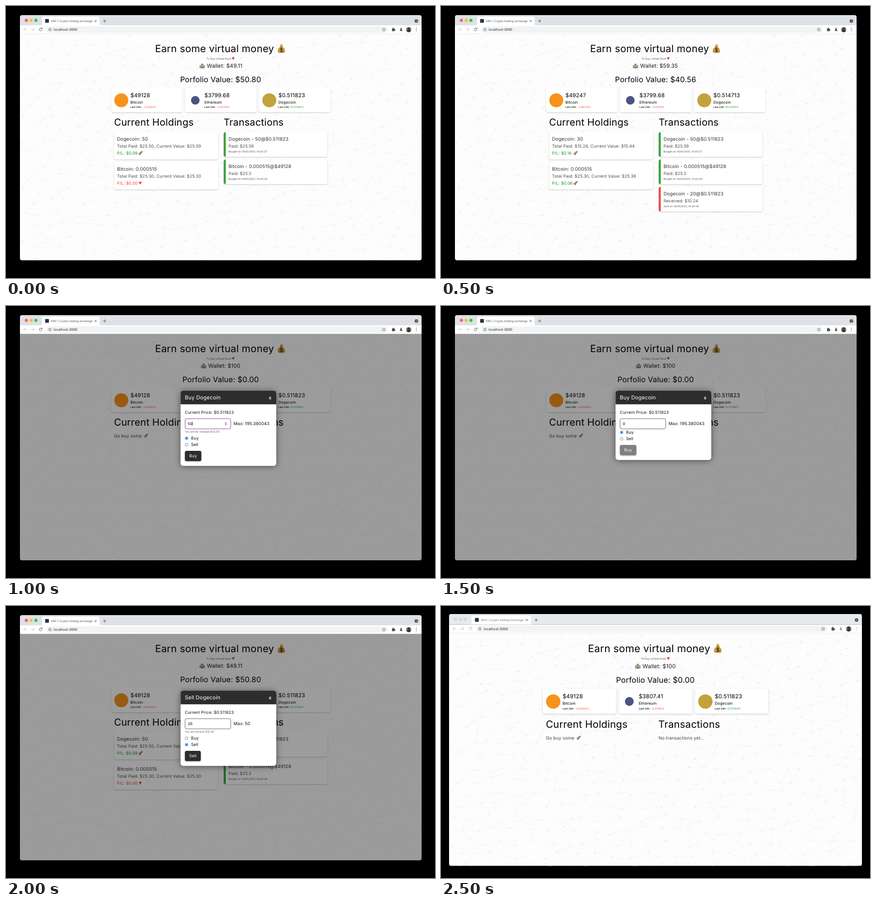
These frames come from a looping animation (800x507 px, 3 s). An HTML page:

```html
<!DOCTYPE html>
<html lang="en">
<head>
<meta charset="utf-8">
<title>Crypto trading exchange</title>
<style>
html, body { margin: 0; width: 100%; height: 100%; overflow: hidden; background: #000; }
svg { display: block; }
#stage { position: absolute; left: 0; top: 0; width: 800px; height: 507px; }
text { font-family: Inter, "Open Sans", sans-serif; letter-spacing: .011em; text-rendering: geometricPrecision; white-space: pre; }
.scene { visibility: hidden; animation: show 3s step-end infinite; }
@keyframes show { 0% { visibility: visible; } 16.6667%, 100% { visibility: hidden; } }
.card { fill: #fff; filter: drop-shadow(0 1px 1.3px rgba(0,0,0,.2)); }
.modal { filter: drop-shadow(0 1px 6px rgba(0,0,0,.5)); }
.button { filter: drop-shadow(0 1px 1px rgba(0,0,0,.4)); }
.line { fill: none; stroke-width: .9; stroke-linecap: round; stroke-linejoin: round; }
</style>
</head>
<body>
<svg id="stage" viewBox="0 0 800 507">
  <defs>
    <clipPath id="window"><rect x="26" y="17" width="749" height="457" rx="4"/></clipPath>
    <g id="net"></g>
    <symbol id="bag" viewBox="0 0 16 17">
      <path d="M5.5 1.2 8 .3l3 .9-1.2 3.6C13.5 7 15.3 11 14.8 14c-.3 2-2 2.6-6.8 2.6S1.400 16 1.200 14C.8 11 2.500 7 6.200 4.800Z" fill="#c9983f"/>
      <path d="M5.500 1.200 8 .3l3 .9-1.200 3.600H6.200Z" fill="#e0b555"/>
      <path d="M5.600 5h4.800" stroke="#6d4a1c" stroke-width="1.200"/>
      <path d="M10.400 8.800C9 7.400 6 7.800 6 9.600c0 2 4.400 1.300 4.400 3.200 0 1.800-3.200 2-4.700.6M8.200 7.200v7.700" fill="none" stroke="#3d2c10" stroke-width="1.100"/>
    </symbol>
    <symbol id="pizza" viewBox="0 0 10 10">
      <path d="M.5 3 9.500.5 6.500 9.700Z" fill="#dc5a34"/>
      <path d="M.5 3 9.500.5" stroke="#b56b2b" stroke-width="1.600"/>
      <circle cx="6" cy="4.500" r="1.500" fill="#b8201c"/>
    </symbol>
    <symbol id="bank" viewBox="0 0 10 10">
      <path d="M.3 4h9.400v5.800H.3Z" fill="#a3a58e"/>
      <path d="M2.300 2.400 5 .3l2.700 2.100v7.400H2.300Z" fill="#c5c3a5"/>
      <path d="M1 5.400h1M1 7.400h1M8 5.400h1M8 7.400h1M3.500 6v3M6.500 6v3" stroke="#4f718c"/>
      <circle cx="5" cy="3.600" r="1.500" fill="#5d8b4b"/>
      <path d="M4.200 7h1.600v2.800H4.200Z" fill="#555d5d"/>
    </symbol>
    <symbol id="rocket" viewBox="0 0 10 10">
      <path d="m3.700 4.100-2.500.8L.4 7l2.500-.4M6 6.300 5.300 8.700 3 9.600l.3-2.500" fill="#c23a34"/>
      <path d="M2.500 6.400C3.600 3 6 .8 9.600.4 9.300 4 7 6.500 3.700 7.600Z" fill="#8b929b"/>
      <path d="M7.400 1 9.600.4 9 2.700Z" fill="#cb3d39"/>
      <circle cx="6.300" cy="3.700" r="1" fill="#35516c"/>
      <path d="m2.200 7.200-1.600 2.200 2.300-1.500Z" fill="#f0a030"/>
    </symbol>
    <symbol id="fall" viewBox="0 0 10 10"><path d="M1.300 2h6.400L4.500 8Z" fill="#e8281e"/></symbol>
  </defs>
</svg>
<script>
const RED = '#ff3b30', GREEN = '#129a1c', DARK = '#2d2d2d', GREY = '#5f6368';

const rect = (x, y, w, h, r, fill, extra = '') =>
  `<rect x="${x}" y="${y}" width="${w}" height="${h}" rx="${r}" fill="${fill}" ${extra}/>`;
const dot = (x, y, r, fill, extra = '') => `<circle cx="${x}" cy="${y}" r="${r}" fill="${fill}" ${extra}/>`;
const text = (x, y, size, str, fill = '#000', extra = '') =>
  `<text x="${x}" y="${y}" font-size="${size}" fill="${fill}" ${extra}>${str}</text>`;
const line = (d, color, extra = '') => `<path class="line" d="${d}" stroke="${color}" ${extra}/>`;
const emoji = (id, x, y, w, h = w) => `<use href="#${id}" x="${x}" y="${y}" width="${w}" height="${h}"/>`;

// Faint constellation: jittered lattice joined to its neighbours.
function network() {
  let seed = 11, lines = '', dots = '';
  const rnd = () => (seed = (seed * 16807) % 2147483647) / 2147483647;
  const cols = 27, rows = 20, pts = [];
  for (let r = 0; r < rows; r++)
    for (let c = 0; c < cols; c++)
      pts.push([(18 + c * 30 + (r % 2) * 15 + (rnd() - .5) * 20).toFixed(1),
                (50 + r * 22.5 + (rnd() - .5) * 16).toFixed(1)]);
  pts.forEach((p, i) => {
    dots += `M${p}h1.4`;
    for (const step of [1, cols, cols - 1]) {
      const q = pts[i + step];
      if (q && Math.abs(q[0] - p[0]) < 60 && rnd() < .7) lines += `M${p}L${q}`;
    }
  });
  return line(lines, '#f2f2f2', 'style="stroke-width:.5"') + line(dots, '#d9d9d9', 'style="stroke-width:1"');
}

function chrome(active) {
  const lights = active ? ['#ff5f57', '#febc2e', '#28c840'] : Array(3).fill('#d3d5d8');
  const ink = active ? GREY : '#b9bcc0', faint = '#c2c5c8';
  return rect(26, 17, 749, 19, 0, active ? '#dee1e6' : '#e7eaed') +
    rect(26, 36, 749, 16, 0, '#fff') +
    lights.map((c, i) => dot(38 + i * 8.9, 26.7, 2.9, c)).join('') +
    '<path d="M64 36q3 0 3-3V23q0-3 3-3h101.500q3 0 3 3v10q0 3 3 3Z" fill="#fff"/>' +
    rect(73, 24.300, 7, 7, 1, '#263740') +
    text(84, 30, 5.2, 'KRV | Crypto trading exchange', active ? '#45494d' : '#6c7075') +
    line('M165.600 26.400l3.200 3.200m0-3.200-3.200 3.200', GREY) +
    line('M181.300 28h5.400m-2.700-2.700v5.400', GREY) +
    dot(765.2, 28, 3.3, '#4d5156') + line('M763.900 27.500l1.300 1.300 1.300-1.300', '#fff', 'style="stroke-width:.7"') +
    line('M38.500 43.800h-5.500m2.500-2.500-2.500 2.500 2.500 2.500M47.200 43.800h5.500m-2.500-2.500 2.500 2.500-2.500 2.500', faint) +
    line('M67 42.400a2.700 2.700 0 1 0 .2 2.300M67.300 40.800v2h-2', ink) +
    rect(75, 38, 637, 11.8, 5.9, '#f1f3f4') +
    dot(82, 43.9, 2.5, 'none', `stroke="${GREY}" stroke-width=".7"`) + line('M82 43.700v1.500M82 42.500v.1', GREY, 'style="stroke-width:.7"') +
    text(89, 46, 6.1, 'localhost:3000', '#202124') +
    '<path d="m704.500 40.800.9 2 2.200.2-1.700 1.500.5 2.200-1.900-1.200-1.900 1.200.5-2.200-1.700-1.500 2.200-.2Z" fill="none" stroke="#5f6368" stroke-width=".7"/>' +
    rect(719.8, 42, 5, 5, .6, '#4d5156') + dot(722.2, 41.8, 1.2, '#4d5156') + dot(725, 44.6, 1.2, '#4d5156') +
    `<path d="M735.700 40.800h2.200v2.200l1.600 3.600h-5.400l1.600-3.600Z" fill="${active ? '#4d5156' : '#a2a5a9'}"/>` +
    dot(751, 44, 4.8, '#77756d') + dot(751, 42.6, 2.2, '#33322f') + '<path d="M746.800 46.300q4.200-3.400 8.400 0-1.400 2.500-4.200 2.500t-4.200-2.500Z" fill="#33322f"/>' +
    [41.3, 43.8, 46.3].map(y => dot(765.2, y, .75, ink)).join('') +
    rect(26, 51.6, 749, .5, 0, '#dcdee1');
}

const card = (x, y, w, h) => rect(x, y, w, h, 3.5, '#fff', 'class="card"');

function coin(x, [name, price, change]) {
  const [color, r] = { Bitcoin: ['#f7931a', 13], Ethereum: ['#4c5382', 8], Dogecoin: ['#c2a23a', 13] }[name];
  const pct = `<tspan fill="${change[0] === '-' ? RED : GREEN}" font-weight="400">${change}%</tspan>`;
  return card(x, 152, 133, 46) + dot(x + 19, 175.8, r, color) +
    text(x + 36, 170, 10.2, '$' + price) + text(x + 36, 182, 7.1, name) +
    text(x + 36, 190.4, 4.65, 'Last 24h: ' + pct, '#000', 'font-weight="500"');
}

function holding(i, [name, amount, paid, value, profit]) {
  const y = 235 + i * 56, up = profit !== '0.00';
  return card(201.5, y, 194, 51) +
    text(207, y + 15.6, 8.95, `${name}: ${amount}`, '#333') +
    text(207, y + 29, 7.9, `Total Paid: $${paid}, Current Value: $${value}`, '#4d4d4d') +
    text(207, y + 42.2, 7.7, 'P/L: $' + profit, up ? GREEN : RED) +
    emoji(up ? 'rocket' : 'fall', 246.5, y + 35, 8.5);
}

function trade(i, [title, sum, stamp]) {
  const y = 235 + i * 51, color = stamp[0] === 'S' ? '#f04a48' : '#35a53a';
  return card(406, y, 193.5, 46) +
    `<path d="M409.800 ${y}v46q-3.800 0-3.800-3.500v-39q0-3.500 3.800-3.500Z" fill="${color}"/>` +
    text(415, y + 15.6, 8.75, title, '#333') + text(415, y + 29, 7.8, sum, '#4d4d4d') +
    text(415, y + 38.4, 4.7, stamp, '#444');
}

function page(d) {
  return rect(26, 51, 749, 423, 0, '#fdfdfd') + '<use href="#net"/>' +
    text(278, 86.2, 18.6, 'Earn some virtual money') + emoji('bag', 505.5, 71, 16, 17) +
    text(374, 99.6, 5, 'To buy virtual food', '#555') + emoji('pizza', 420.700, 95, 5.8) +
    emoji('bank', d.walletX - 13.8, 106, 10.500) + text(d.walletX, 115, 10.2, 'Wallet: $' + d.wallet, '#1a1a1a') +
    text(400.3, 142, 14.1, 'Porfolio Value: $' + d.value, '#000', 'text-anchor="middle"') +
    d.coins.map((c, i) => coin(196 + i * 138, c)).join('') +
    text(201.5, 223, 18.1, 'Current Holdings') + text(405.7, 223, 18.1, 'Transactions') +
    (d.holdings ? d.holdings.map((h, i) => holding(i, h)).join('') + d.trades.map((t, i) => trade(i, t)).join('')
      : text(201.5, 244.8, 8.15, 'Go buy some', '#444') + emoji('rocket', 256.8, 237.5, 8.5) +
        text(406, 244.8, 8.1, 'No transactions yet...', '#444'));
}

function modal({ mode, amount, max, note, focus }) {
  const y = note ? 246.5 : 235.5, h = note ? 140 : 129, w = mode === 'Buy' ? 30.5 : 29.5;
  const radio = (name, cy) => {
    const on = name === mode;
    return dot(336.8, cy, 2.7, '#fff', `stroke="${on ? '#1a73e8' : '#777'}" stroke-width=".8"`) +
      (on ? dot(336.8, cy, 1.7, '#1a73e8') : '') + text(345, cy + 2.8, 7.8, name, '#111');
  };
  return rect(26, 52, 749, 422, 0, '#000', 'fill-opacity=".39"') +
    rect(325.5, 158, 178.5, h, 5, '#fff', 'class="modal"') +
    `<path d="M325.500 183.300V163q0-5 5-5H499q5 0 5 5v20.300Z" fill="${DARK}"/>` +
    text(333.5, 174.1, 9.95, mode + ' Dogecoin', '#fff') +
    text(492.6, 173.9, 8.8, 'x', '#fff', 'text-anchor="middle" font-weight="600"') +
    text(333.5, 201, 7.7, 'Current Price: $0.511823', '#111') +
    rect(334, 210, 85, 19, 2.5, '#fff', `stroke="${focus ? '#963b9f' : '#666'}" stroke-width=".9"`) +
    text(339, 222, 7, amount, '#000') +
    (focus ? rect(347.5, 215.5, .6, 7.5, 0, '#000') + rect(407.5, 215.8, 5, 7.2, 1, '#efefef') +
      '<path d="m408.500 218.700 1.500-1.700 1.500 1.700ZM408.500 220.200l1.500 1.700 1.500-1.700Z" fill="#444"/>' : '') +
    text(424.5, 221.7, 8, 'Max: ' + max, '#111') +
    (note ? text(333.5, 236.4, 4.9, note, '#555') : '') +
    radio('Buy', y) + radio('Sell', y + 12) +
    rect(333.7, y + 23.5, w, 19, 3, note ? DARK : '#808080', 'class="button"') +
    text(333.7 + w / 2, y + 35.8, 7.8, mode, '#fff', 'text-anchor="middle"');
}

const btc = ['Bitcoin', '49128', '-3.23263'], eth = ['Ethereum', '3799.68', '-3.46719'],
      doge = ['Dogecoin', '0.511823', '15.97384'];
const trades = [
  ['Dogecoin - 50@$0.511823', 'Paid: $25.59', 'Bought on 14/05/2021, 10:40:27'],
  ['Bitcoin - 0.000515@$49128', 'Paid: $25.3', 'Bought on 14/05/2021, 10:40:39'],
  ['Dogecoin - 20@$0.511823', 'Received: $10.24', 'Sold on 14/05/2021, 10:40:56']
];
const start = { wallet: '100', walletX: 377, value: '0.00', coins: [btc, eth, doge] };
const bought = {
  wallet: '49.11', walletX: 374.5, value: '50.80', coins: [btc, eth, doge], trades: trades.slice(0, 2),
  holdings: [['Dogecoin', '50', '25.50', '25.59', '0.09'], ['Bitcoin', '0.000515', '25.30', '25.30', '0.00']]
};
const sold = {
  wallet: '59.35', walletX: 371.3, value: '40.56', trades,
  coins: [['Bitcoin', '49247', '-2.98734'], eth, ['Dogecoin', '0.514713', '16.62879']],
  holdings: [['Dogecoin', '30', '15.26', '15.44', '0.18'], ['Bitcoin', '0.000515', '25.30', '25.36', '0.06']]
};
const scenes = [
  { data: bought },
  { data: sold },
  { data: start, dialog: { mode: 'Buy', amount: '50', max: '195.380043', note: 'You will be charged $25.59', focus: true } },
  { data: start, dialog: { mode: 'Buy', amount: '0', max: '195.380043' } },
  { data: bought, dialog: { mode: 'Sell', amount: '20', max: '50', note: 'You will receive $10.24' } },
  { data: { ...start, coins: [btc, ['Ethereum', '3807.41', '-3.27091'], doge] }, idle: true }
];

document.getElementById('net').innerHTML = network();
document.getElementById('stage').insertAdjacentHTML('beforeend', scenes.map((s, i) => {
  const zoom = s.idle ? 'transform="translate(15 14.800) scale(1.028) translate(-26 -17)"' : '';
  return `<g class="scene" style="animation-delay:${i * 500}ms"><g ${zoom}><g clip-path="url(#window)">` +
    page(s.data) + (s.dialog ? modal(s.dialog) : '') + chrome(!s.idle) + '</g></g></g>';
}).join(''));
</script>
</body>
</html>
```
